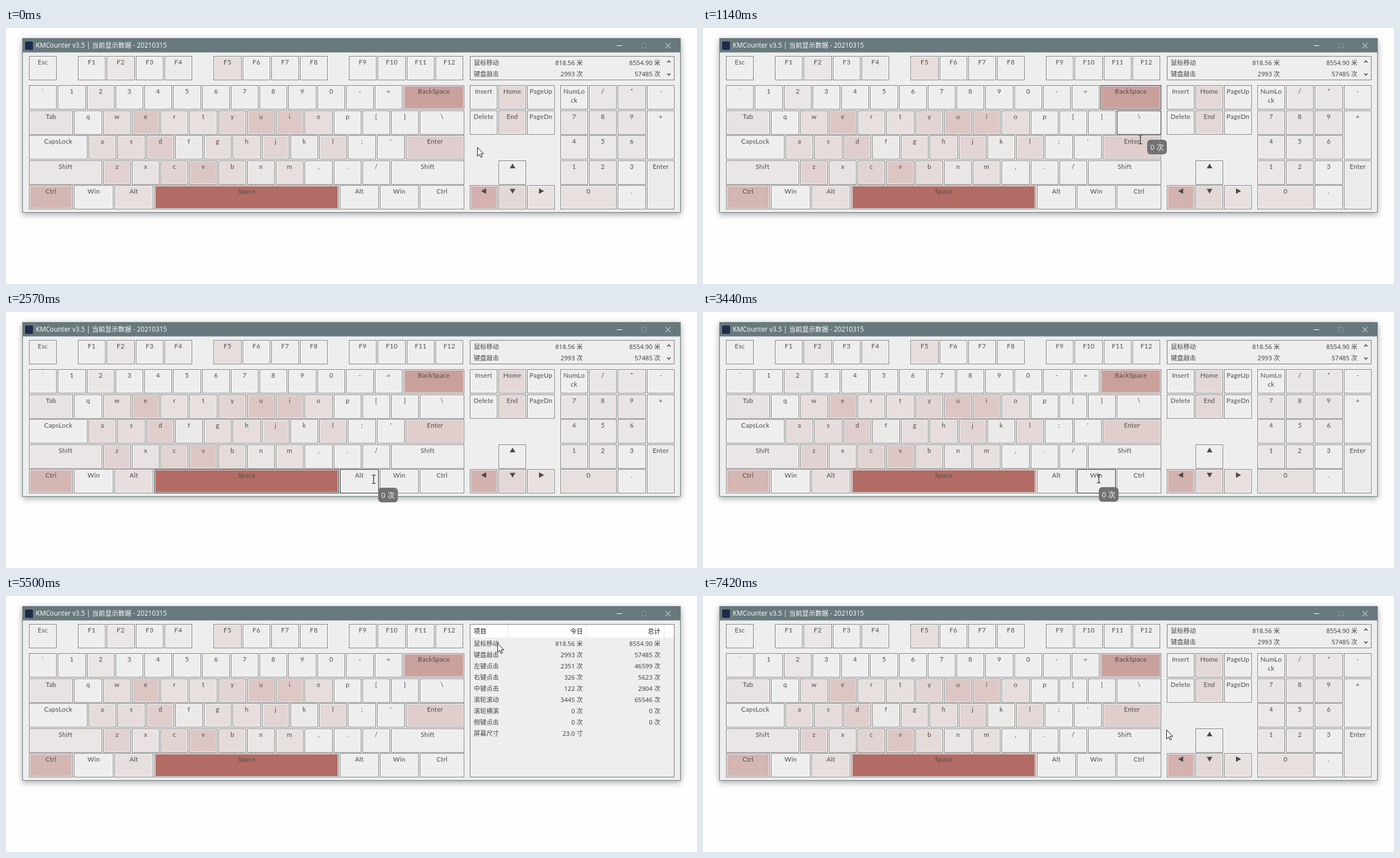
Recreate the animation shown at these times as an HTML page. Size 1229 by 456 pixels, loop 8000 ms.

```html
<!DOCTYPE html>
<html lang="zh">
<head>
<meta charset="utf-8">
<style>
html, body { margin: 0; width: 100%; height: 100%; overflow: hidden; background: #fefefe; }
svg { display: block; width: 1229px; height: 456px; }
text { font: 11.2px "Noto Sans", "Noto Sans CJK SC", "Noto Sans CJK", sans-serif; fill: #444; }
.window { fill: #eee; stroke: #68797d; filter: drop-shadow(0 3px 6px rgba(0, 0, 0, .35)); }
.title { font-size: 11.7px; font-family: "Open Sans", "Noto Sans CJK SC", "Noto Sans CJK", sans-serif; fill: #fff; }
.label { font: 11.5px Lato, sans-serif; letter-spacing: .3px; text-anchor: middle; fill: #4c4c4c; }
.head { fill: #111; }
.end { text-anchor: end; }
.key { fill: #fff; stroke: #787878; }
.key.hot { stroke: #1c1c1c; }
.box { fill: #eee; stroke: #787878; }
.glyph { fill: #4a4a4a; }
.line { fill: none; stroke: #fff; }
#tip rect { fill: #727274; }
#tip text { font-size: 13px; font-family: "Open Sans", "Noto Sans CJK SC", "Noto Sans CJK", sans-serif; fill: #f4f4f4; text-anchor: middle; }
</style>
</head>
<body>
<svg viewBox="0 0 1229 456">
  <rect class="window" x="29.5" y="18.5" width="1170" height="310"/>
  <rect x="29" y="18" width="1171" height="25.500" fill="#68797d"/>
  <rect x="34" y="24" width="14" height="15" rx="2" fill="#202c4c"/>
  <text class="title" x="53" y="35">KMCounter v3.5 | 当前显示数据 - 20210315</text>
  <path class="line" d="M1086 31.500h10M1173 27l9 9m0-9l-9 9"/>
  <path class="line" d="M1130.500 27.500h8v8h-8z" style="stroke:#87959a"/>
  <g id="board"></g>
  <g id="compact">
    <g id="pads"></g>
    <rect class="box" x="825.500" y="50.500" width="363" height="42"/>
    <path class="line" d="M1176 61.500l3-3 3 3M1176 81l3 3 3-3" style="stroke:#444;stroke-width:1.600"/>
    <path class="glyph" d="M896 250h10l-5-8.500zM896 286.500h10l-5 8.500zM854 285.500v10l-9-5zM948 285.500v10l9-5z"/>
  </g>
  <g id="full">
    <rect class="box" x="825.500" y="50.500" width="363" height="272"/>
    <rect x="826" y="51" width="362" height="23" fill="#fff"/>
    <path class="line" d="M892.500 51v23M1031.500 51v23M1170.500 51v23" style="stroke:#e4e4e4"/>
  </g>
  <g id="tip"><rect height="26" rx="6"/><text y="18"></text></g>
  <path id="arrow" d="M.5.5V16.500L4.200 13 6.600 18.500 9 17.400 6.600 12H11.500Z" fill="#fff" stroke="#111"/>
  <path id="beam" d="M-3.500-7.500H-1L0-6.500 1-7.500H3.500M0-6.500V6.500M-3.500 7.500H-1L0 6.500 1 7.500H3.500" fill="none" stroke="#222" stroke-width="1.200"/>
</svg>
<script>
const $ = id => document.getElementById(id);
const board = $('board'), pads = $('pads'), compact = $('compact'), full = $('full');
const tip = $('tip'), arrow = $('arrow'), beam = $('beam');
const keys = {};

function add(parent, tag, attrs, text) {
  const el = document.createElementNS('http://www.w3.org/2000/svg', tag);
  for (const name in attrs) el.setAttribute(name, attrs[name]);
  if (text) el.textContent = text;
  parent.appendChild(el);
  return el;
}

// heat runs from 0 (idle) to 100 (most pressed)
function heatColor(heat) {
  const hot = [178, 108, 101];
  return `rgb(${hot.map(c => Math.round(238 + (c - 238) * heat / 100))})`;
}

function key(parent, label, left, top, width, heat, height = 42) {
  const x = left + .5, y = top + .5;
  const border = add(parent, 'rect', { class: 'key', x, y, width, height });
  add(parent, 'rect', { x: x + 1.5, y: y + 1.5, width: width - 3, height: height - 3, fill: heatColor(heat) });
  label.split('|').forEach((line, i) =>
    add(parent, 'text', { class: 'label', x: x + width / 2, y: y + 14.5 + i * 16 }, line));
  keys[label] = border;
}

// each item is label:heat:span, where span is the distance to the next key
const PITCH = 51.25, GAP = 3;
function row(parent, x, y, spec, right) {
  const items = spec.split(' ');
  items.forEach((item, i) => {
    const [label, heat = 0, span = PITCH] = item.split(':');
    const left = Math.round(x);
    x += +span;
    const end = right && i === items.length - 1 ? right : Math.round(x) - GAP;
    key(parent, label, left, y, end - left, +heat);
  });
}

const Y = [50, 102, 147, 191, 236, 280];
const NAV = 824.6, NUM = 985.9, RIGHT = 814;

row(pads, NAV, Y[1], 'Insert Home:17 PageUp');
row(pads, NAV, Y[2], 'Delete End:17 PageDn');
row(pads, NAV + PITCH, Y[4], ':0');
row(pads, NAV, Y[5], ':47 :17 :10');
row(pads, NUM, Y[1], 'NumLo|ck /:6 *:6 -');
row(pads, NUM, Y[2], '7:8 8:8 9:8');
row(pads, NUM, Y[3], '4:5 5:5 6:6');
row(pads, NUM, Y[4], '1:6 2:6 3');
row(pads, NUM, Y[5], '0:11:102.5 .');
key(pads, '+', 1140, Y[2], 48, 0, 86);
key(pads, 'Enter', 1140, Y[4], 48, 3, 86);

row(board, 41, Y[0], 'Esc');
row(board, 128.1, Y[0], 'F1 F2:6 F3 F4:3');
row(board, 369.4, Y[0], 'F5:13 F6 F7 F8');
row(board, 610.2, Y[0], 'F9 F10 F11 F12');
row(board, 41, Y[1], '` 1 2:6 3 4 5 6 7 8 9 0 - = BackSpace:60', RIGHT);
row(board, 41, Y[2], 'Tab:9:80.4 q w:13 e:31 r:11 t:11 y:20 u:31 i:29 o:13 p [ ] \\', RIGHT);
row(board, 41, Y[3], "CapsLock:0:106 a:15 s:14 d:25 f:4 g:13 h:13 j:20 k:4 l:17 ; ' Enter:25", RIGHT);
row(board, 41, Y[4], 'Shift:6:131.5 z:22 x:9 c:21 v:31 b:15 n:6 m:11 , . / Shift', RIGHT);
row(board, 41, Y[5], 'Ctrl:43:80.3 Win:0:71.3 Alt:12:71.3 Space:100:330 Alt:0:71.3 Win:0:71.2 Ctrl', RIGHT);

function statRow(parent, y, cells, cls = '') {
  [832, 1026, 1164].forEach((x, i) =>
    cells[i] && add(parent, 'text', { class: cls + (i ? ' end' : ''), x, y }, cells[i]));
}
const stats = [
  '鼠标移动,818.56 米,8554.90 米', '键盘敲击,2993 次,57485 次', '左键点击,2351 次,46599 次',
  '右键点击,326 次,5623 次', '中键点击,122 次,2904 次', '滚轮滚动,3445 次,65546 次',
  '滚轮横滚,0 次,0 次', '侧键点击,0 次,0 次', '屏幕尺寸,23.0 寸'
].map(line => line.split(','));
stats.slice(0, 2).forEach((cells, i) => statRow(compact, 66 + i * 20, cells));
statRow(full, 67, ['项目', '今日', '总计'], 'head');
stats.forEach((cells, i) => statRow(full, 88.5 + i * 20, cells));

// pointer path: time, x, y
const path = [
  [0, 838, 212], [420, 838, 212], [560, 818, 180], [700, 792, 140], [820, 781, 128],
  [950, 781, 140], [1090, 782, 184], [1140, 778, 199], [1190, 779, 211], [1480, 779, 212],
  [1600, 735, 250], [1720, 646, 269], [1770, 621, 276], [1980, 588, 291], [2240, 580, 298],
  [2340, 580, 298], [2520, 654, 298], [3160, 654, 298], [3400, 698, 297],
  [3860, 770, 296], [4020, 770, 296], [4150, 800, 262], [4260, 849, 232], [5350, 849, 232],
  [5500, 874, 84], [7140, 874, 84], [7420, 824, 238], [8000, 824, 238]
];
function pointer(t) {
  const i = Math.max(1, path.findIndex(p => p[0] >= t));
  const [a, b] = [path[i - 1], path[i]];
  const k = Math.max(0, (t - a[0]) / (b[0] - a[0]));
  return [a[1] + (b[1] - a[1]) * k, a[2] + (b[2] - a[2]) * k];
}

// highlighted keys: label, from, to
const hots = [
  ['BackSpace', 650, 1520], ['\\', 980, 1520], ['Enter', 1240, 2380], ['Shift', 1600, 2400],
  ['Space', 1900, 2800], ['Alt', 2420, 3240], ['Win', 3280, 4080], ['Ctrl', 3680, 5350],
  ['Shift', 4110, 5350]
];
// tooltip text from a given time
const tips = [
  [0, ''], [650, '142 次'], [980, '0 次'], [1240, '136 次'], [1600, '0 次'],
  [1900, '412 次'], [2420, '0 次'], [4210, '']
];

function place(el, x, y) {
  el.setAttribute('transform', `translate(${Math.round(x)} ${Math.round(y)})`);
}
function show(el, on) {
  el.style.display = on ? '' : 'none';
}

function draw(t) {
  const [x, y] = pointer(t);
  const open = t >= 5450 && t < 7420;
  show(full, open);
  show(compact, !open);

  Object.values(keys).forEach(el => el.classList.remove('hot'));
  hots.forEach(([label, from, to]) => {
    if (t >= from && t < to) keys[label].classList.add('hot');
  });

  const onKeys = x < 815;
  show(beam, onKeys);
  show(arrow, !onKeys);
  place(onKeys ? beam : arrow, x, y);

  const text = tips.filter(p => p[0] <= t).pop()[1];
  show(tip, text);
  if (text) {
    const width = 21 + 7 * (text.length - 1);
    // the tooltip trails the pointer slightly
    const [tx, ty] = pointer(t - 50);
    tip.firstChild.setAttribute('width', width);
    tip.lastChild.setAttribute('x', width / 2);
    tip.lastChild.textContent = text;
    place(tip, tx + 8, ty + 15);
  }
}

const start = performance.now();
function tick() {
  draw((performance.now() - start) % 8000);
  requestAnimationFrame(tick);
}
tick();
</script>
</body>
</html>
```
